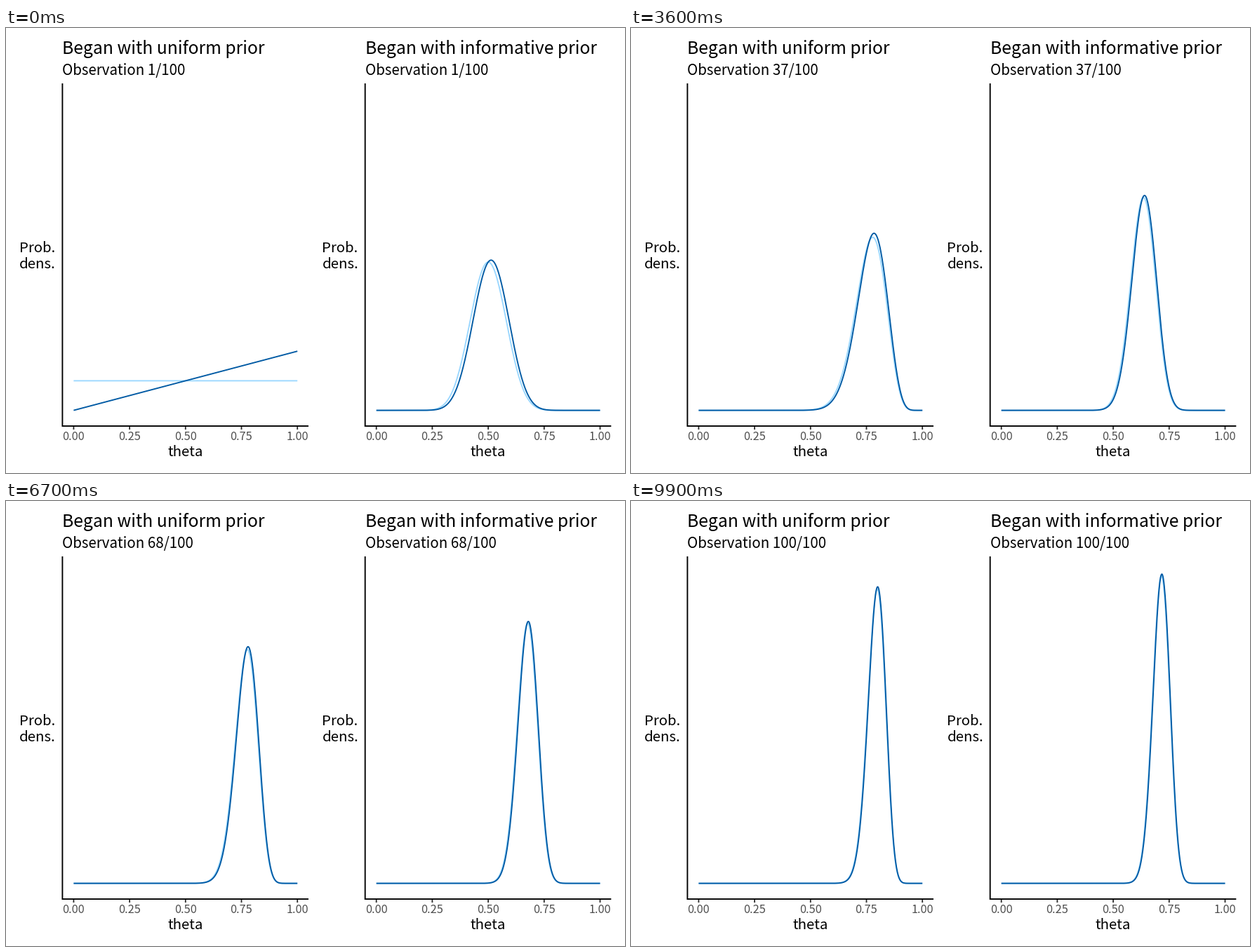
Animation, 882 px wide and 635 px high, one loop 10 s. Source, as a matplotlib script:

```python
from itertools import accumulate
from math import exp, lgamma

import matplotlib.pyplot as plt
import numpy as np
from matplotlib.animation import FuncAnimation

W, H, DPI = 882, 635, 64
N = 100
FAILURES = {3, 6, 11, 18, 21, 24, 26, 30, 38, 42,
            47, 50, 53, 56, 62, 72, 79, 83, 87, 99}
HITS = [0, *accumulate(int(i not in FAILURES) for i in range(1, N + 1))]

DARK, LIGHT = "#005aa4", "#9cd8ff"
PANEL_W, TOP, BOTTOM = 350.6, 80, 568
X_PAD, X_SPAN = 16, 318.8
BASE_Y, UNIT = 545.6, 42.2

plt.rcParams["font.family"] = ["Noto Sans CJK JP", "Liberation Sans"]
theta = np.linspace(0, 1, 501)


def px(size):
    """Convert pixels to points."""
    return size * 72 / DPI


def beta_pdf(a, b):
    scale = exp(lgamma(a + b) - lgamma(a) - lgamma(b))
    return scale * theta ** (a - 1) * (1 - theta) ** (b - 1)


fig = plt.figure(figsize=(W / DPI, H / DPI), dpi=DPI, facecolor="white")
ax = fig.add_axes([0, 0, 1, 1])
ax.set(xlim=(0, W), ylim=(H, 0))
ax.axis("off")


def label(x, y, text, size, color="black", ha="left"):
    return ax.text(x, y, text, fontsize=px(size), color=color,
                   ha=ha, va="baseline")


def line(xs, ys, color, width=1.9, cap="butt"):
    return ax.plot(xs, ys, color=color, lw=px(width), snap=False,
                   solid_capstyle=cap, solid_joinstyle="round")[0]


class Panel:
    def __init__(self, left, title, prior):
        self.prior = prior
        x0 = left + X_PAD
        for i in range(5):
            x = x0 + X_SPAN * i / 4
            line([x, x], [BOTTOM, BOTTOM + 5], "#333333")
            label(x, 588.5, f"{i / 4:.2f}", 16.3, "#4d4d4d", "center")
        xs = x0 + X_SPAN * theta
        self.before = line(xs, 0 * xs, LIGHT)
        self.after = line(xs, 0 * xs, DARK)
        line([left, left], [TOP, BOTTOM], "black", cap="projecting")
        line([left, left + PANEL_W], [BOTTOM, BOTTOM], "black")

        label(left, 37.3, title, 24.7)
        self.subtitle = label(left, 67.3, "", 20.5)
        label(left - 61.3, 320.3, "Prob.", 20.4)
        label(left - 61.3, 343.3, "dens.", 20.4)
        label(left + PANEL_W / 2, 611.3, "theta", 20.4, ha="center")

    def density_y(self, n):
        hits = HITS[n]
        pdf = beta_pdf(self.prior + hits, self.prior + n - hits)
        return BASE_Y - UNIT * pdf

    def show(self, n):
        self.before.set_ydata(self.density_y(n - 1))
        self.after.set_ydata(self.density_y(n))
        self.subtitle.set_text(f"Observation {n}/{N}")
        return self.before, self.after, self.subtitle


panels = [Panel(80.4, "Began with uniform prior", 1),
          Panel(511.7, "Began with informative prior", 20)]


def update(frame):
    return [artist for panel in panels for artist in panel.show(frame + 1)]


anim = FuncAnimation(fig, update, frames=N, interval=100,
                     repeat=True, repeat_delay=0, blit=False)
plt.show()
```
